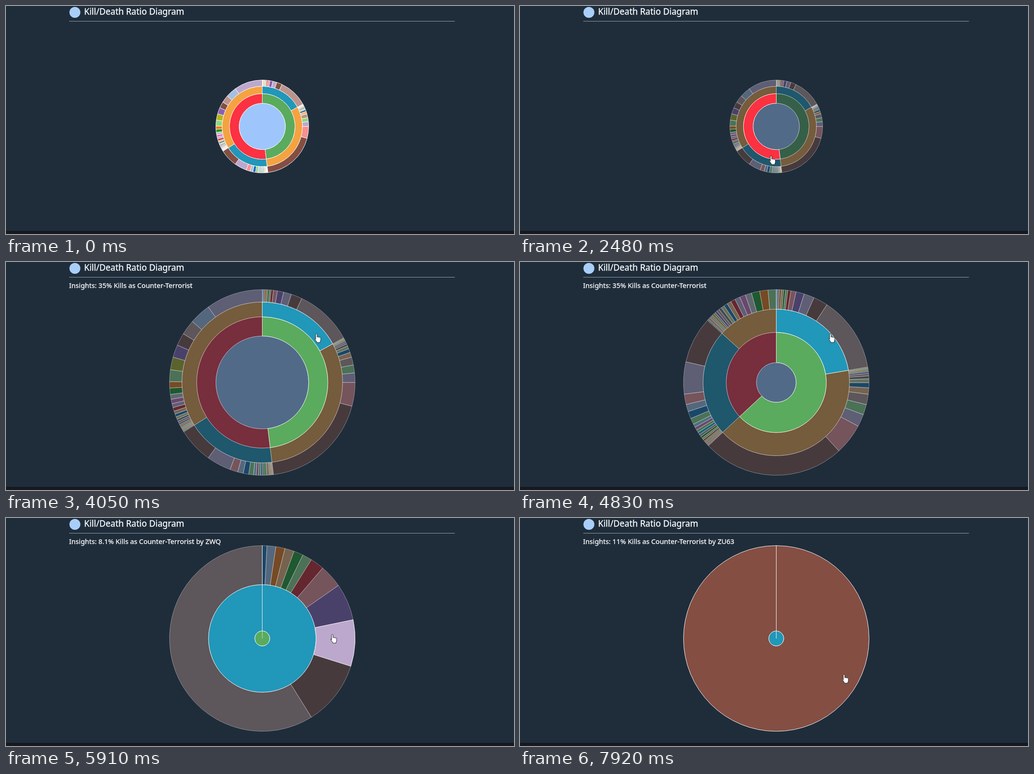
An HTML page with a canvas that plays this animation: 1117 by 501 pixels, repeating every 8000 ms.

```html
<!DOCTYPE html>
<html lang="en">
<head>
<meta charset="utf-8">
<title>Kill/Death Ratio Diagram</title>
<style>
  html, body { margin: 0; width: 100%; height: 100%; overflow: hidden; background: #1f2d3b; }
  .stage { position: relative; width: 1117px; height: 501px; overflow: hidden; }
  svg, canvas { position: absolute; left: 0; top: 0; display: block; }
  text { font-family: "Noto Sans", "Open Sans", sans-serif; fill: #fff; stroke: #fff; stroke-width: 0.3px; }
</style>
</head>
<body>
<div class="stage">
  <svg width="1117" height="501">
    <rect y="494" width="1117" height="7" fill="#17191f"/>
    <circle cx="151.5" cy="14" r="12" fill="#a9cff9"/>
    <text x="171.7" y="19" font-size="19">Kill/Death Ratio Diagram</text>
    <rect x="139" y="33" width="848" height="1" fill="#98a1a9"/>
    <text id="insight" x="138.7" y="57" font-size="15.05"></text>
  </svg>
  <canvas id="chart" width="1117" height="501"></canvas>
</div>
<script>
const LOOP = 8000, TAU = Math.PI * 2, CX = 563.5, CY = 264.7;
const FIRST = 296, STEP = 155.5;   // the picture refreshes at this pace
const ctx = document.getElementById('chart').getContext('2d');
const insight = document.getElementById('insight');

const clamp = v => Math.min(1, Math.max(0, v));
const mix = (a, b, k) => a.map((v, i) => v + (b[i] - v) * k);
const ease = t => t < 0.5 ? 4 * t ** 3 : 1 - 4 * (1 - t) ** 3;
const sum = list => list.reduce((a, b) => a + b, 0);

const palette = ('1f77b4 aec7e8 ff7f0e ffbb78 2ca02c 98df8a d62728 ff9896 9467bd c5b0d5 ' +
  '8c564b c49c94 e377c2 f7b6d2 7f7f7f c7c7c7 bcbd22 dbdb8d 17becf 9edae5').split(' ').map(soften);

// Slightly darker version of a hex colour
function soften(hex) {
  return `rgb(${hex.match(/../g).map(h => Math.max(0, parseInt(h, 16) - 8))})`;
}

const weaponName = tint => tint % 2 ? 'KZJX'[tint % 4] + 'WQ' : 'ZU' + (53 + tint);

// Each branch: `small` minor leaves that grow along a power curve, then the major [size, tint] leaves
const branches = [
  { side: 0, role: 'Kills', size: 124, small: 6, bend: 0.1, seed: 0, stride: 1,
    major: [[3, 6], [5, 7], [8, 8], [10, 9], [14, 10], [73, 11]] },
  { side: 0, role: 'Deaths', size: 226, small: 10, bend: 2.5, seed: 16, stride: 3,
    major: [[10, 11], [10, 5], [12, 9], [30, 7], [138, 10]] },
  { side: 1, role: 'Kills', size: 131, small: 13, bend: 1.5, seed: 15, stride: 7,
    major: [[6, 5], [7, 0], [7, 1], [10, 7], [31, 9], [45, 10]] },
  { side: 1, role: 'Deaths', size: 247, small: 18, bend: 2, seed: 4, stride: 3,
    major: [[8, 4], [8, 2], [15, 5], [16, 16], [16, 8], [16, 10], [19, 11], [27, 1], [72, 9]] }
];
const total = sum(branches.map(b => b.size));

function leavesOf({ size, small, bend, seed, stride, major }) {
  const curve = Array.from({ length: small }, (_, i) => (i / (small - 1)) ** bend);
  const gain = (size - sum(major.map(m => m[0])) - small) / sum(curve);
  return [...curve.map((v, i) => [1 + gain * v, (seed + stride * i) % 20]), ...major];
}

function makeNode(depth, start, size, color, parent, label) {
  const node = { depth, x0: start / total, x1: (start + size) / total, size, color, parent, label, children: [] };
  if (parent) parent.children.push(node);
  return node;
}

const root = makeNode(0, 0, total, '#9fc6fc');
let at = 0;
[['#5aab5e', 'Counter-Terrorist'], ['#fc3141', 'Terrorist']].forEach(([color, label], i) => {
  const own = branches.filter(b => b.side === i);
  const side = makeNode(1, at, sum(own.map(b => b.size)), color, root, label);
  for (const branch of own) {
    const tone = branch.role === 'Kills' ? '#2197b9' : '#f4a340';
    const node = makeNode(2, at, branch.size, tone, side, branch.role);
    for (const [size, tint] of leavesOf(branch)) {
      makeNode(3, at, size, palette[tint], node, weaponName(tint));
      at += size;
    }
  }
});

const nodes = [root];
for (let i = 0; i < nodes.length; i++) nodes.push(...nodes[i].children);

// View: x domain, y domain start, inner and outer radius
const kills = root.children[0].children[0], rifle = kills.children[10];
const home = [0, 1, 0, 0, 102];
const zooms = [
  { start: 3069, view: [0, 1, 0, 0, 204] },
  { start: 4494, view: [kills.x0, kills.x1, 0.5, 16.5, 204] },
  { start: 7143, view: [rifle.x0, rifle.x1, 0.75, 16.5, 204] }
];
const viewAt = t => zooms.reduce((view, z) => mix(view, z.view, ease(clamp((t - z.start) / 750))), home);

// Key points of the pointer tip: time, x, y
const track = [
  [140, 1165, 70], [610, 855, 183], [910, 640, 190], [1230, 548, 186], [1380, 527, 201.5],
  [1540, 500, 215], [1860, 478, 275], [2330, 540, 359], [2790, 578.5, 264], [3410, 578.5, 264],
  [4025, 682.5, 158], [5450, 682.5, 158], [5890, 717.5, 256], [6220, 717.5, 256], [6510, 712.5, 344]
];

function pointerAt(t) {
  const i = track.findIndex(p => p[0] > t);
  if (i === 0) return track[0].slice(1);
  if (i < 0) return track[track.length - 1].slice(1);
  const a = track[i - 1], b = track[i];
  return mix(a, b, (t - a[0]) / (b[0] - a[0])).slice(1);
}

// Start and end angle (clockwise from the top), inner and outer radius
function shapeOf(node, [a, b, d, inner, outer]) {
  const angle = x => clamp((x - a) / (b - a)) * TAU;
  const radius = y => Math.max(0, inner + (outer - inner) * (Math.sqrt(y) - Math.sqrt(d)) / (1 - Math.sqrt(d)));
  return [angle(node.x0), angle(node.x1), radius(node.depth / 4), radius((node.depth + 1) / 4)];
}

function hit(t) {
  const [x, y] = pointerAt(t), view = viewAt(t);
  const r = Math.hypot(x - CX, y - CY);
  const turn = (Math.atan2(x - CX, CY - y) + TAU) % TAU;
  return nodes.find(node => {
    const [a0, a1, r0, r1] = shapeOf(node, view);
    return turn >= a0 && turn < a1 && r >= r0 && r < r1;
  });
}

// Over the centre, the side touched last stays lit
function hoveredAt(t) {
  const node = hit(t);
  if (node !== root) return node;
  let last = hoveredAt(t - STEP);
  while (last && last.depth > 1) last = last.parent;
  return last;
}

function drawNode(node, view, alpha) {
  const [start, end, r0, r1] = shapeOf(node, view);
  if (r1 < 0.05) return;
  const a0 = start - TAU / 4, a1 = end - TAU / 4;
  ctx.beginPath();
  if (end - start > TAU - 1e-6) {
    ctx.arc(CX, CY, r1, 0, TAU);
    if (r0 > 0) {
      ctx.moveTo(CX + r0, CY);
      ctx.arc(CX, CY, r0, TAU, 0, true);
    }
  } else {
    ctx.arc(CX, CY, r1, a0, a1);
    ctx.arc(CX, CY, r0, a1, a0, true);
    ctx.closePath();
  }
  ctx.globalAlpha = alpha;
  ctx.fillStyle = node.color;
  ctx.fill('evenodd');
  ctx.strokeStyle = '#fff';
  ctx.lineWidth = 1;
  ctx.lineJoin = 'bevel';
  ctx.stroke();
}

const hand = new Path2D('M-1.8 13V1.6a1.8 1.8 0 0 1 3.6 0V8a1.6 1.6 0 0 1 3 .4a1.6 1.6 0 0 1 3 .7' +
  'a1.5 1.5 0 0 1 2.8 1.2v4.5q0 2-1.4 4v2.2h-8.4v-1.6l-4.6-6.6q-1-2 .6-2.4 1-.1 1.4 1z');
const arrow = new Path2D('M0 0V15l3.5-3.2 2.4 5.4 2.2-1-2.4-5.2h4.8z');

function drawPointer(shape, [x, y]) {
  ctx.save();
  ctx.globalAlpha = 1;
  ctx.translate(x, y);
  ctx.scale(0.9, 0.9);
  ctx.fillStyle = '#fff';
  ctx.strokeStyle = '#1b1d22';
  ctx.lineWidth = 1.1;
  ctx.fill(shape);
  ctx.stroke(shape);
  ctx.restore();
}

function describe(node) {
  if (!node || node.depth < 2) return '';
  const share = Number((100 * node.size / node.parent.size).toPrecision(2));
  const branch = node.depth === 3 ? node.parent : node;
  const by = node.depth === 3 ? ` by ${node.label}` : '';
  return `Insights: ${share}% ${branch.label} as ${branch.parent.label}${by}`;
}

function render(t) {
  const hovered = hoveredAt(t), view = viewAt(t);
  const lit = new Set();
  for (let n = hovered; n && n !== root; n = n.parent) lit.add(n);
  ctx.clearRect(0, 0, 1117, 501);
  for (const node of nodes) drawNode(node, view, !hovered || lit.has(node) ? 1 : 0.4);
  drawPointer(hovered ? hand : arrow, pointerAt(t));
  insight.textContent = describe(hovered);
}

const begin = performance.now();
let shown;
function loop() {
  const now = (performance.now() - begin) % LOOP;
  const tick = FIRST + STEP * Math.floor((now - FIRST) / STEP);
  if (tick !== shown) render(shown = tick);
  requestAnimationFrame(loop);
}
loop();
</script>
</body>
</html>
```
